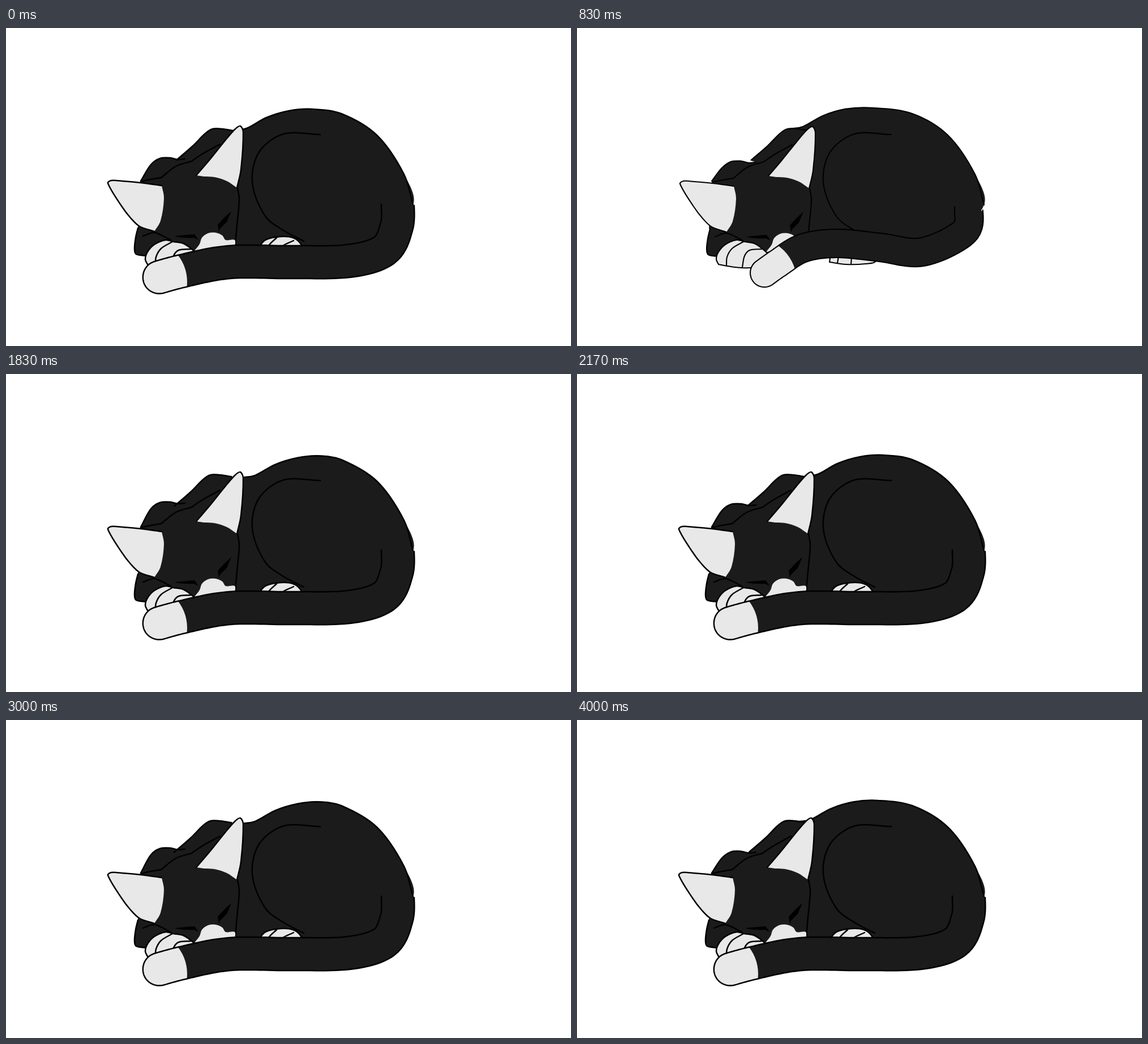
Recreate the animation shown at these times as an HTML page with a canvas. Size 998x561 px, loop 4.17 s.

```html
<!DOCTYPE html>
<html lang="en">
<head>
<meta charset="utf-8">
<title>Sleeping cat</title>
<style>
html, body { margin: 0; width: 100%; height: 100%; overflow: hidden; background: #fff; }
canvas { display: block; }
</style>
</head>
<body>
<canvas id="stage" width="998" height="561"></canvas>
<script>
const ctx = document.getElementById('stage').getContext('2d');
const FUR = '#1b1b1b', WHITE = '#e8e8e8', INK = '#000';

const clamp = v => Math.max(0, Math.min(1, v));
const mix = (a, b, k) => a + (b - a) * k;
const dist = (a, b) => Math.hypot(a[0] - b[0], a[1] - b[1]);
const pts = text => text.split(' ').map(s => s.split(',').map(Number));

// Smooth curve through points; a repeated point makes a corner.
function curve(p) {
  const slope = i => {
    const a = p[Math.max(i - 1, 0)], b = p[Math.min(i + 1, p.length - 1)];
    const d = dist(a, p[i]) + dist(p[i], b) || 1;
    return [(b[0] - a[0]) / d, (b[1] - a[1]) / d];
  };
  const path = new Path2D();
  path.moveTo(...p[0]);
  for (let i = 1; i < p.length; i++) {
    const a = p[i - 1], b = p[i], d = dist(a, b) / 3;
    if (!d) continue;
    const s = slope(i - 1), e = slope(i);
    path.bezierCurveTo(a[0] + s[0] * d, a[1] + s[1] * d, b[0] - e[0] * d, b[1] - e[1] * d, ...b);
  }
  return path;
}

function fill(p, color) {
  ctx.fillStyle = color;
  ctx.fill(curve(p));
}
function line(p) {
  ctx.stroke(curve(p));
}
// The outer edge is inked, the inner edge only closes the colour.
function patch(outer, inner, color) {
  fill([...outer, ...inner], color);
  line(outer);
}
// Straight-sided continuation of a curve.
const corners = text => pts(text).flatMap(p => [p, p]);

function moved(dx, dy, paint) {
  ctx.save();
  ctx.translate(dx, dy);
  paint();
  ctx.restore();
}

const back = pts('402,181 425,177 460,158 500,146 540,143 592,151 655,189 703,258 719,312');
const arm = pts('238,270 256,241 272,230 290,229 303,232 316,231');
const nape = pts('301,233 330,208 352,186 365,178 382,178 402,181');
const thigh = pts('555,188 490,187 447,219 435,272 458,332 490,357 526,376');

// Tail spine, root to end: lying, swung aside, curled over the face.
const spines = [
  pts('692,312 690,350 668,392 605,411 500,413 395,413 310,429 243,448'),
  pts('692,319 684,360 610,395 535,387 460,380 400,388 355,415 311,447'),
  pts('693,318 682,368 620,419 550,427 470,423 400,407 340,385 276,363')
];

function along(p, u) {
  const f = u * (p.length - 1), i = Math.min(Math.floor(f), p.length - 2), t = f - i;
  const at = k => p[Math.max(0, Math.min(p.length - 1, k))];
  return [0, 1].map(c => {
    const [a, b, d, e] = [i - 1, i, i + 1, i + 2].map(k => at(k)[c]);
    return b + t / 2 * (d - a + t * (2 * a - 5 * b + 4 * d - e + t * (3 * (b - d) + e - a)));
  });
}

// Offsets the spine to both sides and rounds the end.
function drawTail(swing) {
  const k = swing > 1 ? 1 : 0;
  const spine = spines[k].map((p, i) => p.map((v, c) => mix(v, spines[k + 1][i][c], swing - k)));
  const tip = spine[spine.length - 1], half = mix(29, 25, clamp(swing));
  const upper = [], lower = [];
  for (let i = 0; i <= 120; i++) {
    const u = Math.sin(i / 120 * Math.PI / 2);
    const p = along(spine, u), a = along(spine, Math.max(0, u - .004)), b = along(spine, Math.min(1, u + .004));
    const d = dist(a, b), w = half * Math.sqrt(1 - (1 - clamp(dist(p, tip) / half)) ** 2);
    const nx = (b[1] - a[1]) / d * w, ny = (a[0] - b[0]) / d * w;
    upper.push([p[0] - nx, p[1] - ny]);
    lower.unshift([p[0] + nx, p[1] + ny]);
  }
  const body = new Path2D();
  [...upper, ...lower].forEach(p => body.lineTo(...p));
  ctx.fillStyle = FUR;
  ctx.fill(body);
  ctx.save();
  ctx.clip(body);
  ctx.fillStyle = WHITE;
  ctx.beginPath();
  ctx.arc(...tip, 77, 0, 7);
  ctx.fill();
  ctx.restore();
  ctx.stroke(body);
}

function drawBody(breath) {
  const top = back.map(([x, y]) => {
    const w = clamp((592 - x) / 70);
    return [x + breath * w, y + breath * w * .12];
  });
  const bump = arm.map(([x, y], i) => [x, i ? y - breath * .22 : y]);
  const hump = nape.map(([x, y]) => [x - breath * .25, y]);
  fill([...bump, ...hump, ...corners('430,185 410,385 340,396 250,400 233,353')], FUR);
  patch(top, corners('640,404 410,404 395,200'), FUR);
  line(bump);
  line(hump);
  line(thigh);
}

function drawFoot() {
  const sole = pts('446,399 449,384 460,373 485,368 507,370 520,380 527,398 510,402 475,403 446,399');
  patch(sole, [], WHITE);
  line(pts('460,400 464,384 478,370'));
  line(pts('484,402 487,386 508,375'));
}

function drawHead(muzzle) {
  patch(pts('233,353 229,370 227,390 230,399 247,402'), corners('300,394 262,355'), FUR);
  line(pts('238,271 256,267 274,264 274,264 300,244 328,235 328,235 347,222 378,205'));
  line(pts('409,282 412,302 408,348 405,381'));
  line(pts('242,367 262,361 291,374'));

  patch(pts('275,278 238,273 205,270 186,269 180,274 204,314 220,335 236,350 262,359 262,359'),
    pts('273,340 279,300 275,278'), WHITE);
  patch(pts('336,260 360,232 385,201 404,179 414,173 419,184 415,250 408,282 408,282'),
    pts('390,270 368,263 350,262 336,260'), WHITE);

  ctx.fillStyle = INK;
  ctx.fill(new Path2D('M398 323L386 334L374 347L376 360L378 354L390 342Z'));
  ctx.fill(new Path2D('M299 367Q318 365 333 364L340 374L332 370Q315 371 299 368Z'));
  if (muzzle) fill(pts('332,394 342,381 346,370 357,362 370,361 382,366 388,374 404,374 404,388'), WHITE);
}

function drawPaw() {
  patch(pts('250,417 246,408 250,395 262,382 282,374 296,377 313,380 328,390 342,404 343,415 318,422 290,423 266,420 250,417'), [], WHITE);
  line(pts('264,419 265,404 274,389 294,377'));
  line(pts('292,422 296,402 305,392 326,390'));
}

// Breathing moves the back; swing runs 0 lying, 1 aside, 2 over the face.
function draw(breath, swing) {
  ctx.fillStyle = '#fff';
  ctx.fillRect(0, 0, 998, 561);
  ctx.strokeStyle = INK;
  ctx.lineWidth = swing ? 2.1 : 2.5;
  ctx.lineCap = ctx.lineJoin = 'round';

  const nod = swing ? 2 : 0;
  drawBody(breath);
  moved(0, 14 * clamp(1 - Math.abs(swing - 1)), drawFoot);
  moved(nod, nod / 2, () => drawHead(swing < 2));
  drawPaw();
  drawTail(swing);
}

// One letter for each drawing: even, in, out, and f while the tail flicks.
const rhythm = 'eoooffffoeiiieoeoeiioeooo';
const breaths = { e: 0, i: 15, o: -12, f: -26 };

// Six drawings a second, three to each half second.
let shown = -1;
function tick(now) {
  const t = now % 4170, r = t % 500;
  const step = 3 * Math.floor(t / 500) + (r >= 170) + (r >= 330);
  if (step !== shown) {
    shown = step;
    const letter = rhythm[step];
    draw(breaths[letter], letter === 'f' ? (step - 3) / 2 : 0);
  }
  requestAnimationFrame(tick);
}
tick(performance.now());
</script>
</body>
</html>
```
